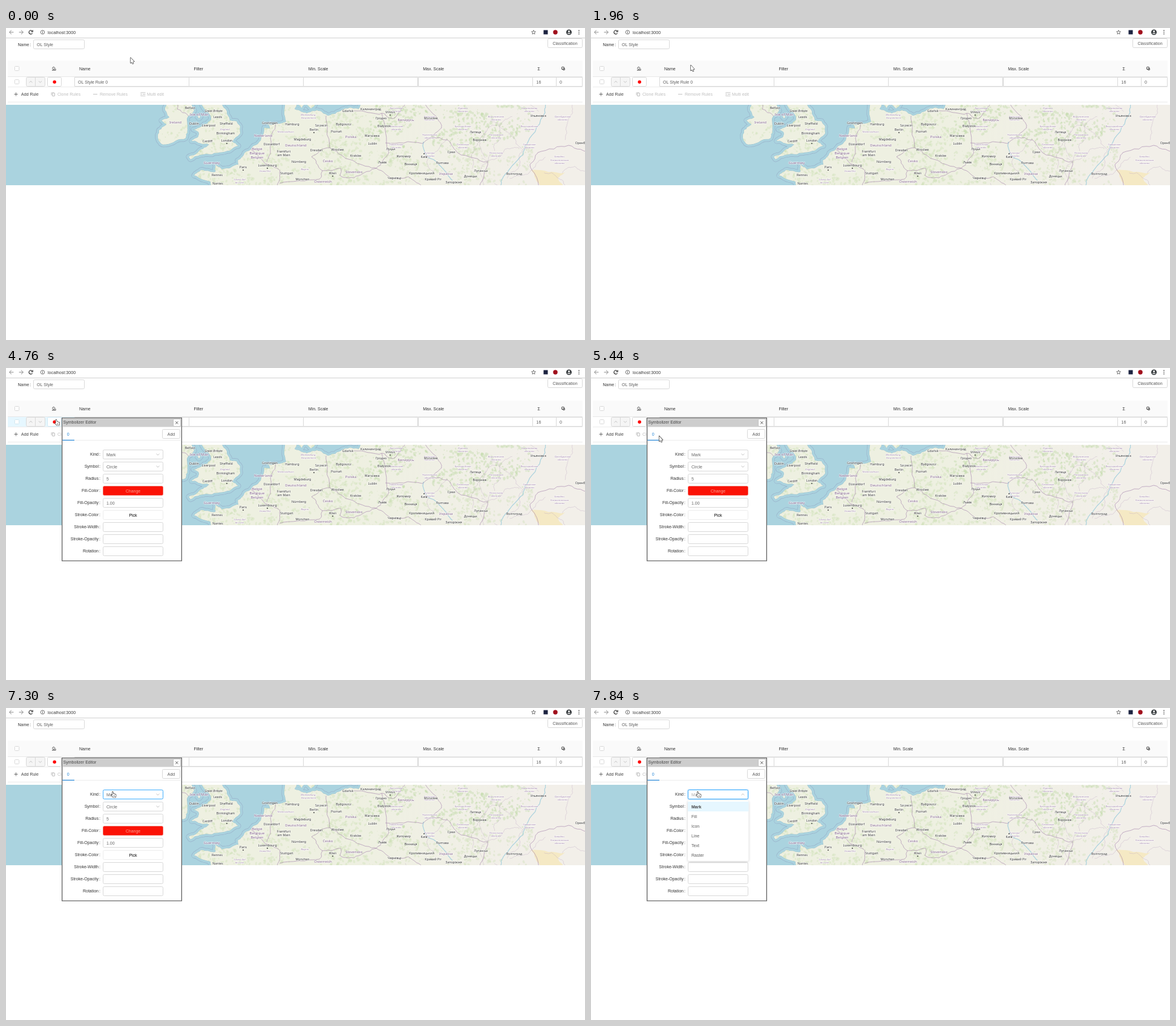
Write an HTML page with a canvas that moves like this. It is 957x516 px and loops after 8000 ms.

```html
<!DOCTYPE html>
<html lang="en">
<head>
<meta charset="utf-8">
<title>Style editor</title>
<style>
html, body { margin: 0; width: 100%; height: 100%; overflow: hidden; background: #fff; }
canvas { display: block; width: 957px; height: 516px; }
</style>
</head>
<body>
<canvas id="stage" width="957" height="516"></canvas>
<script>
const W = 957, H = 516, LOOP = 8000, MAP_Y = 127, MAP_H = 133;
const UI = '"Liberation Sans", Arial, sans-serif';
const MAP = '"Noto Sans", sans-serif';
const GREY = '#d9d9d9', INK = '#333', SOFT = '#5c5c5c', OFF = '#bfbfbf', BLUE = '#2486d8', SEA = '#aad3df';
const stage = document.getElementById('stage').getContext('2d');
let c = stage;

// ---------- helpers ----------
const smooth = k => k * k * (3 - 2 * k);
const clamp = k => Math.max(0, Math.min(1, k));

function text(s, x, y, color = INK, size = 7, align = 'left', weight = '') {
  c.font = `${weight} ${size}px ${UI}`;
  c.textAlign = align;
  c.textBaseline = 'alphabetic';
  c.fillStyle = color;
  c.fillText(s, x, y + 2.5);
}
function rect(x, y, w, h, color) {
  c.fillStyle = color;
  c.fillRect(x, y, w, h);
}
function box(x, y, w, h, fill = '#fff', stroke = GREY, r = 2) {
  c.beginPath();
  c.roundRect(x + .5, y + .5, w - 1, h - 1, r);
  c.fillStyle = fill;
  c.fill();
  c.strokeStyle = stroke;
  c.lineWidth = 1;
  c.stroke();
}
function line(pts, color, width = 1, close) {
  c.beginPath();
  for (let i = 0; i < pts.length; i += 2) c.lineTo(pts[i], pts[i + 1]);
  if (close) c.closePath();
  c.strokeStyle = color;
  c.lineWidth = width;
  c.stroke();
}
function disc(x, y, r, color) {
  c.beginPath();
  c.arc(x, y, r, 0, 7);
  c.fillStyle = color;
  c.fill();
}
function ring(x, y, r, color, width, from = 0, to = 7) {
  c.beginPath();
  c.arc(x, y, r, from, to);
  c.strokeStyle = color;
  c.lineWidth = width;
  c.stroke();
}
function chevron(x, y, dir) {
  line([x - 2.5, y - dir * 1.2, x, y + dir * 1.2, x + 2.5, y - dir * 1.2], OFF, .9);
}
let seed = 11;
function rnd() {
  seed = (seed * 16807) % 2147483647;
  return seed / 2147483647;
}
// Jagged outline through a few key points; the jitter stays small on long edges
function rough(pts, close) {
  let p = [];
  for (let i = 0; i < pts.length; i += 2) p.push([pts[i], pts[i + 1]]);
  if (close) p.push(p[0]);
  for (let k = 0; k < 3; k++) {
    const q = [p[0]];
    for (let i = 1; i < p.length; i++) {
      const [ax, ay] = p[i - 1], [bx, by] = p[i];
      const jolt = Math.min(Math.hypot(bx - ax, by - ay) * .28, 3.5);
      q.push([(ax + bx) / 2 + (rnd() - .5) * jolt, (ay + by) / 2 + (rnd() - .5) * jolt], p[i]);
    }
    p = q;
  }
  const path = new Path2D();
  p.forEach(([x, y]) => path.lineTo(x, y));
  if (close) path.closePath();
  return path;
}

// ---------- map ----------
const ireland = [270,120, 263,136, 270,148, 257,153, 265,160, 253,169, 251,182, 256,191, 268,192,
  297,182, 300,168, 299,152, 311,137, 306,120];
const britain = [322,120, 326,130, 339,150, 333,158, 310,168, 318,172, 318,179, 307,187, 336,193,
  317,206, 302,213, 305,217, 331,208, 366,203, 384,195, 373,188, 387,174, 387,163, 381,154, 370,153, 365,141, 356,120];
const coast = [343,270, 338,254, 311,244, 322,235, 346,238, 346,226, 357,234, 384,226, 383,219, 394,207,
  416,192, 427,165, 436,166, 433,159, 463,155, 460,120, 481,120, 477,134, 497,141, 514,136, 532,145,
  561,133, 583,134, 589,120, 980,120, 980,270];
const borders = [
  [284,122, 283,134, 302,146],
  [447,156, 437,182, 437,208, 431,222],
  [404,200, 428,224, 453,236, 449,262],
  [529,145, 535,198, 505,213, 523,236, 518,250, 452,257],
  [535,198, 578,222, 612,232, 575,248, 552,244, 553,232, 523,236],
  [575,137, 621,141, 633,206, 612,232, 640,249, 665,246, 690,264],
  [621,141, 640,150, 663,122],
  [627,190, 688,191, 720,165, 713,149, 690,122],
  [705,180, 730,185, 746,206, 796,221, 783,264],
  [970,207, 930,194, 879,206, 866,226, 884,264]];
const volga = [893,122, 891,140, 862,190, 851,212, 822,246, 817,264];
const dnipro = [690,188, 692,207, 727,238, 738,252];

const cities = [
  ['Belfast',304,132], ['Dublin',311,158], ['Leeds',350,147], ['Liverpool',335,161], ['Sheffield',364,158],
  ['Birmingham',363,174], ['Cardiff',333,187], ['London',365,186], ['Rennes',349,243], ['Nantes',350,257],
  ['Paris',392,230], ['Groningen',436,157], ['Hamburg',473,159], ['Düsseldorf',439,192], ['Frankfurt|am Main',459,207],
  ['Luxembourg',432,227], ['Stuttgart',464,240], ['München',490,250], ['Nürnberg',484,221], ['Berlin',509,168],
  ['Magdeburg',490,184], ['Szczecin',521,161], ['Dresden',513,202], ['Poznań',546,171], ['Bydgoszcz',558,159],
  ['Gdańsk',565,137], ['Калининград',603,134], ['Wrocław',548,201], ['Kraków',578,211], ['Warszawa',605,178],
  ['Lublin',606,191], ['Białystok',625,162], ['Vilnius',635,139], ['Гродно',620,149], ['Wien',540,240],
  ['Львів',622,222], ['Луцьк',636,200], ['Житомир',657,212], ['Київ',691,213], ['Вінниця',669,225],
  ['Чернівці',642,248], ['Кропивницький',687,240], ['Кривий Ріг',706,250], ['Полтава',721,223], ['Запоріжжя',740,255],
  ['Донецьк',768,245], ['Луганськ',785,236], ['Суми',736,205], ['Воронеж',783,185], ['Липецк',776,172],
  ['Волгоград',840,241], ['Ульяновск',880,145], ['Могилев',702,149], ['Оренбург',953,190]];
const capitals = 'London Paris Berlin Wien Київ Luxembourg Vilnius';
const countries = [
  ['Ireland',280,156], ['Isle of Man',319,143], ['Nederland',425,178], ['België|Belgique|Belgien',415,207],
  ['Deutschland',479,194], ['Polska',570,180], ['Česko',532,220], ['Slovensko',575,238],
  ['Österreich',524,254], ['Беларусь',661,152], ['Україна',727,241], ['Guernsey',340,223]];
const states = [['England',362,167], ['Mecklenburg-|Vorpommern',500,146], ['Niedersachsen',462,171],
  ['Bayern',494,233], ['Grand Est',428,236], ['Centre-Val|de Loire',386,253], ['Западно-|Казахстанская|область',915,218]];
// Eastern provinces, column by column
const provinces = `Брестская Гомельская Смоленская Брянская Чернігівська Тульская Курская Белгородская
  Рязанская Воронежская Ростовская Пензенская Саратовская Волгоградская Самарская Оренбургская`.split(/\s+/);

function label([s, x, y], size, color, style = '') {
  c.font = `${style} ${size}px ${MAP}`;
  c.textAlign = 'center';
  c.lineWidth = 1.4;
  c.strokeStyle = 'rgba(255,255,255,.65)';
  c.fillStyle = color;
  const rows = s.split('|');
  rows.forEach((row, i) => {
    const ry = y + size * .36 + (i - (rows.length - 1) / 2) * size * 1.2;
    c.strokeText(row, x, ry);
    c.fillText(row, x, ry);
  });
}
function trace(paths, color, width) {
  c.strokeStyle = color;
  c.lineWidth = width;
  paths.forEach(p => c.stroke(rough(p)));
}
function woods() {
  for (let i = 0; i < 3200; i++) {
    const x = 250 + rnd() * 620, y = MAP_Y + rnd() * MAP_H, r = .5 + rnd() * 1.7;
    const wood = Math.sin(x * .045 + Math.sin(y * .07) * 2) * Math.cos(y * .06 + x * .013);
    if (wood + rnd() * .9 < .35) continue;
    c.beginPath();
    c.ellipse(x, y, r * 1.5, r, rnd() * 3, 0, 7);
    c.fillStyle = x > 600 && y < 200 ? 'rgba(188,216,163,.4)' : 'rgba(194,217,170,.3)';
    c.fill();
  }
}
// Wandering province limits in the east
function limits() {
  const paths = [];
  for (let i = 0; i < 16; i++) {
    let x = 640 + rnd() * 300, y = MAP_Y + rnd() * MAP_H, a = rnd() * 7;
    const path = [];
    for (let k = 0; k < 7; k++) {
      path.push(x, y);
      a += (rnd() - .5) * 1.8;
      x += Math.cos(a) * 12;
      y += Math.sin(a) * 12;
    }
    paths.push(path);
  }
  trace(paths, 'rgba(176,148,184,.6)', .5);
}
function drawMap() {
  const cv = document.createElement('canvas');
  cv.width = W;
  cv.height = H;
  c = cv.getContext('2d');
  c.beginPath();
  c.rect(0, MAP_Y, W, MAP_H);
  c.clip();
  rect(0, MAP_Y, W, MAP_H, SEA);
  const land = new Path2D();
  [ireland, britain, coast].forEach(p => land.addPath(rough(p, true)));
  for (const [x, y, r] of [[319, 147, 2.5], [489, 126, 6], [504, 126, 7]]) {
    land.addPath(rough([x - r, y, x, y - r, x + r, y, x, y + r], true));
  }
  c.lineJoin = 'round';
  for (const [color, width] of [['#98b2cb', 9], [SEA, 7.6], ['#9dbcc5', .7]]) {
    c.strokeStyle = color;
    c.lineWidth = width;
    c.stroke(land);
  }
  const g = c.createLinearGradient(0, 0, W, 0);
  g.addColorStop(.6, '#eef0e1');
  g.addColorStop(.9, '#f2efe9');
  c.fillStyle = g;
  c.fill(land);

  c.save();
  c.clip(land);
  woods();
  c.fillStyle = '#f5e9c4';
  c.fill(rough([868,235, 924,239, 912,248, 924,264, 884,264], true));
  trace([volga, dnipro], '#a9d2de', 1.2);
  limits();
  trace(borders, 'rgba(160,126,168,.65)', .9);
  c.restore();

  provinces.forEach((s, i) => {
    const col = Math.floor(i / 3), row = i % 3;
    label([s + '|область', 645 + col * 55, 172 + (row - 1) * 30 + (col % 2) * 14 - 7], 4.2, '#a184ad', 'italic');
  });
  states.forEach(p => label(p, 4.2, '#a184ad', 'italic'));
  countries.forEach(p => label(p, 6, '#85648f'));
  cities.forEach(p => {
    label(p, 5.2, '#343434');
    if (capitals.includes(p[0])) disc(p[1], p[2] + (p[0] === 'Київ' ? -5 : 5), 1.1, '#555');
  });
  label(['Great Britain', 343, 137], 5.2, '#303030', 'italic 500');
  c = stage;
  return cv;
}

// ---------- page ----------
function browserBar() {
  for (const [x, d] of [[9, -1], [25, 1]]) {
    line([x - 3.5, 7, x + 3.5, 7], '#8b8b8b', 1);
    line([x, 3.7, x + d * 3.4, 7, x, 10.3], '#8b8b8b', 1);
  }
  ring(41, 7, 3, '#444', 1.2, .5, 5.6);
  line([41.4, 6.2, 44.3, 6.2, 44.3, 3.4], '#444', 1.2);
  ring(60.5, 7, 3.2, '#555', .8);
  line([60.5, 6.5, 60.5, 9], '#555', .9);
  rect(60, 4.8, 1, 1, '#555');
  text('localhost:3000', 69, 7.1, '#3c3c3c', 7.2);
  const star = [];
  for (let i = 0; i < 10; i++) {
    const a = i * Math.PI / 5 - Math.PI / 2, r = i % 2 ? 1.6 : 3.6;
    star.push(872 + Math.cos(a) * r, 7.2 + Math.sin(a) * r);
  }
  line(star, '#555', .8, true);
  rect(888.5, 3.5, 7, 7, '#1c2340');
  disc(908, 7, 3.7, '#a00f1c');
  disc(930.5, 7, 4.6, '#3c4043');
  disc(930.5, 5.6, 1.5, '#fff');
  c.beginPath();
  c.ellipse(930.5, 9.4, 2.8, 1.5, 0, Math.PI, 0);
  c.fill();
  for (let i = 0; i < 3; i++) disc(947, 4.2 + i * 2.8, .85, '#555');
  rect(0, 16, W, 1, '#d0d0d0');
}
function tableHead() {
  rect(3, 54, 950, 27, '#fafafa');
  rect(3, 80, 950, 1, '#e8e8e8');
  box(14, 63, 8, 8, '#fff', GREY, 1);
  ['Name', 'Filter', 'Min. Scale', 'Max. Scale', 'Σ'].forEach((s, i) => text(s, 121 + i * 189.4, 67));
  line([78.6, 64, 81.2, 66.6, 78.8, 68.6, 76.6, 66.4], '#222', .8, true);
  rect(76, 69.3, 6.5, .9, '#222');
  disc(82, 68.2, .6, '#222');
  box(918, 64, 5, 5, '#fafafa', '#444', .8);
  box(920, 66, 4, 4, 'rgba(0,0,0,0)', '#444', .8);
}
function tableRow(hover) {
  if (hover) rect(3, 81, 110, 16, '#e6f7ff');
  box(14, 85, 8, 8, '#fff', hover ? '#d3e6ee' : GREY, 1);
  box(33, 81, 32, 16, '#f5f5f5');
  rect(48, 82, 1, 14, GREY);
  chevron(41, 89, -1);
  chevron(56.5, 89, 1);
  box(68, 81, 24, 16, '#fff', hover ? '#cfe9f6' : GREY);
  disc(80.2, 89.2, 2.7, '#f00');
  rect(3, 97, 950, 1, '#ececec');
  ['OL Style Rule 0', '', '', ''].forEach((s, i) => {
    const x = Math.floor(113 + i * 189.4);
    box(x, 81, 190, 16, '#fff', GREY, 0);
    text(s, x + 6, 89, SOFT);
  });
  box(870, 81, 40, 16, '#fff', GREY, 0);
  box(909, 81, 44, 16, '#fff', GREY, 0);
  text('16', 876.5, 89, SOFT);
  text('0', 915, 89, SOFT);
}
function toolbar() {
  line([13.5, 109.5, 19.5, 109.5], '#555', .8);
  line([16.5, 106.5, 16.5, 112.5], '#555', .8);
  text('Add Rule', 25, 109.5, '#444');
  line([75, 111, 75, 107, 79, 107], OFF, .8);
  box(76, 107, 5, 6, '#fff', OFF, .5);
  text('Clone Rules', 85, 109.5, OFF);
  line([144, 109.5, 151, 109.5], OFF, .9);
  text('Remove Rules', 155, 109.5, OFF);
  for (let i = -1; i < 2; i++) line([i ? 222.5 : 226, 109.5 + i * 2.7, 230.5, 109.5 + i * 2.7], OFF, .9);
  line([222.5, 108.2, 224.3, 109.5, 222.5, 110.8], OFF, .9);
  text('Multi edit', 233, 109.5, OFF);
  rect(3, 122, 950, 1, '#eaeaea');
}
function page(hover) {
  text('Name', 19.5, 27);
  text(':', 39.2, 27);
  box(45, 19, 85, 16);
  text('OL Style', 51, 27, SOFT);
  box(895, 17, 58, 16);
  text('Classification', 924, 25, SOFT, 7, 'center');
  tableHead();
  tableRow(hover);
  toolbar();
}

// ---------- editor window ----------
const fields = [['Kind', 'Mark'], ['Symbol', 'Circle'], ['Radius', '5'], ['Fill-Color', 'Change'], ['Fill-Opacity', '1.00'],
  ['Stroke-Color', 'Pick'], ['Stroke-Width', ''], ['Stroke-Opacity', ''], ['Rotation', '']];

function editor(focus, open) {
  rect(92, 82, 199, 237.5, '#626262');
  rect(93.3, 83.3, 196.4, 235, '#fff');
  rect(93.3, 83.3, 196.4, 14.2, '#cdcdcd');
  text('Symbolizer Editor', 94.6, 89.7, '#484848');
  box(276, 84, 13, 13, '#fff', '#c4c4c4', 1.5);
  line([280.2, 88.3, 284.4, 92.7], '#333', .8);
  line([284.4, 88.3, 280.2, 92.7], '#333', .8);
  rect(93.3, 119, 196.4, 1, '#ececec');
  rect(93.3, 118.8, 19.7, 1.2, BLUE);
  text('0', 102.7, 109.3, BLUE, 7, 'center');
  box(258, 101, 30, 16);
  text('Add', 273, 109, SOFT, 7, 'center');

  fields.forEach(([name, value], i) => {
    const y = 143 + i * 20;
    text(name, 153, y - .3, INK, 7, 'right');
    text(':', 154, y - .3);
    if (value === 'Change') {
      box(160, y - 8, 100, 16, '#fb1206', '#f3685f');
      text(value, 210, y, '#f8a193', 7, 'center');
    } else if (value === 'Pick') {
      box(160, y - 8, 100, 16, '#fff', '#ececec');
      text(value, 210, y, '#000', 7, 'center');
    } else {
      box(160, y - 8, 100, 16);
      text(value, 166, y, '#666');
      if (i === 1) chevron(251, y, 1);
    }
  });
  kindBox(focus, open);
  if (open) dropdown(open);
}
function kindBox(focus, open) {
  if (open) {
    c.beginPath();
    c.roundRect(159, 134, 102, 18, 3);
    c.fillStyle = `rgba(24,144,255,${.2 * open})`;
    c.fill();
  }
  box(160, 135, 100, 16);
  if (focus) box(160, 135, 100, 16, '#fff', `rgba(64,175,255,${focus})`);
  text('Mark', 166, 143, open ? '#aaa' : '#666');
  chevron(251, 143, open ? -1 : 1);
}
function dropdown(alpha) {
  c.save();
  c.globalAlpha = alpha;
  c.shadowColor = 'rgba(0,0,0,.2)';
  c.shadowBlur = 4;
  c.shadowOffsetY = 1;
  c.beginPath();
  c.roundRect(160, 153, 100.5, 100, 2);
  c.fillStyle = '#fff';
  c.fill();
  c.shadowColor = 'transparent';
  rect(160, 155, 100.5, 16, '#e6f7ff');
  ['Mark', 'Fill', 'Icon', 'Line', 'Text', 'Raster'].forEach((s, i) =>
    text(s, 166, 163 + i * 16, i ? SOFT : '#444', 7, 'left', i ? '' : 'bold'));
  c.restore();
}

// ---------- pointer ----------
const arrow = [0,0, 0,9, 2,7.2, 3.4,10.2, 4.7,9.6, 3.5,6.7, 6,6.5];
const hand = [1.2,.4, 2.6,.4, 3,3.4, 7,4.2, 7.5,6, 6.8,9.3, 2.6,9.3, 0,5.6, 1.4,5.4];
const ticks = [4600, 5040, 5440, 5760, 6040, 6300, 6700];

function place(t) {
  if (t < 4600) {
    const k = t < 1280 ? 0 : smooth(Math.min(9, 1 + Math.floor((t - 1280) / 85)) / 9);
    return [206 - 41 * k, 49 + 12.5 * k];
  }
  // Held between ticks, along a quarter-sine arc
  const tick = ticks.filter(s => s <= t).pop();
  const u = smooth(clamp((tick - 4600) / 2150));
  return [81 + 93.5 * u, 85.5 + 53 * Math.sin(u * Math.PI / 2)];
}
function pointer(t) {
  const shape = (t >= 4600 && t < 5040) || t >= 6300 ? hand : arrow;
  c.save();
  c.translate(...place(t));
  c.lineJoin = 'round';
  line(shape, '#111', 1.1, true);
  c.fillStyle = '#fff';
  c.fill();
  if (shape === hand) for (const x of [3.6, 5.2]) line([x, 6, x, 8.2], '#333', .6);
  c.restore();
}

// ---------- loop ----------
const map = drawMap();
const start = performance.now();

function frame() {
  const t = (performance.now() - start) % LOOP;
  rect(0, 0, W, H, '#fff');
  browserBar();
  page(t >= 4600 && t < 5440);
  c.drawImage(map, 0, 0);
  if (t >= 4760) {
    const focus = t < 6700 ? 0 : t < 7000 ? .6 : 1;
    const open = t < 7580 ? 0 : t < 7840 ? .75 : 1;
    editor(focus, open);
  }
  pointer(t);
  requestAnimationFrame(frame);
}
frame();
</script>
</body>
</html>
```
